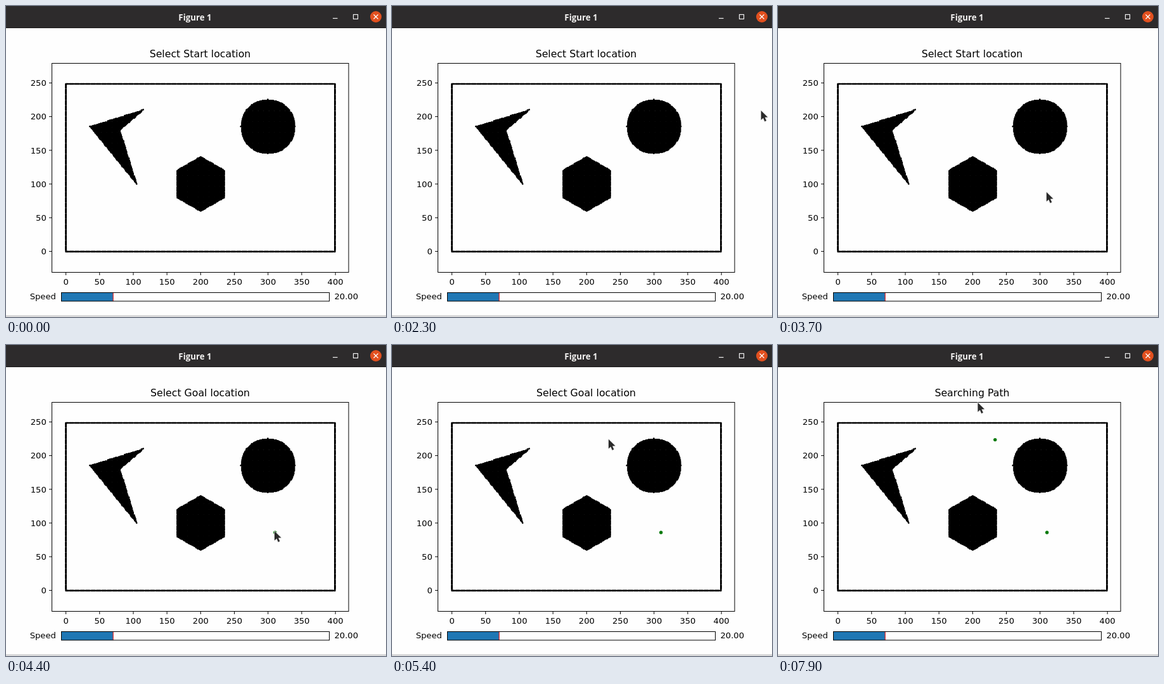
Animation, 600 px wide and 491 px high, one loop 8000 ms. Source, as an HTML page with a canvas:

```html
<!DOCTYPE html>
<html lang="en">
<head>
<meta charset="utf-8">
<title>Figure 1</title>
<style>
html, body { margin: 0; width: 100%; height: 100%; overflow: hidden; background: #fefefe; }
canvas { display: block; }
</style>
</head>
<body>
<canvas id="stage" width="600" height="491"></canvas>
<script>
const ctx = document.getElementById('stage').getContext('2d');
const LOOP = 8000, STEP = 100;
const UNIT = 1.0638, PIXEL = 0.946;
const SANS = '"DejaVu Sans", sans-serif';
const px = x => 94.6 + x * UNIT;
const py = y => 387.4 - y * UNIT;

// Cursor waypoints: time, x, y
const route = [
  [2200, 600, 150], [2700, 434, 297], [3000, 410, 303], [3300, 410, 303],
  [3700, 424, 294], [4500, 424, 294], [5300, 342, 149], [6900, 342, 149],
  [7700, 315.5, 91]
];
const START_CLICK = 4000, GOAL_CLICK = 6000;

function text(ctx, str, x, y, size, align, color = '#000', font = SANS, weight = 400) {
  ctx.font = `${weight} ${size}px ${font}`;
  ctx.textAlign = align;
  ctx.fillStyle = color;
  ctx.fillText(str, x, y);
}

function line(ctx, x1, y1, x2, y2, color, width) {
  ctx.strokeStyle = color;
  ctx.lineWidth = width;
  ctx.beginPath();
  ctx.moveTo(x1, y1);
  ctx.lineTo(x2, y2);
  ctx.stroke();
}

function dot(ctx, x, y, r, color) {
  ctx.fillStyle = color;
  ctx.beginPath();
  ctx.arc(x, y, r, 0, Math.PI * 2);
  ctx.fill();
}

function polygon(points) {
  const path = new Path2D();
  points.forEach(([x, y]) => path.lineTo(x, y));
  path.closePath();
  return path;
}

function drawTitleBar(c) {
  c.fillStyle = '#2d2b2c';
  c.fillRect(0, 0, 600, 35);
  c.fillStyle = '#1c1a1b';
  c.fillRect(0, 34, 600, 1);
  text(c, 'Figure 1', 298.5, 22.5, 13.3, 'center', '#f2f1f0', '"Open Sans", sans-serif', 700);
  line(c, 516, 19.5, 523.5, 19.5, '#f0f0f0', 1.2);
  c.strokeRect(548.5, 13.5, 7, 7);
  dot(c, 584, 17, 9, '#e2501f');
  line(c, 580.5, 13.5, 587.5, 20.5, '#fff', 1.3);
  line(c, 587.5, 13.5, 580.5, 20.5, '#fff', 1.3);
}

function drawAxes(c) {
  c.strokeStyle = '#000';
  c.lineWidth = 1;
  c.strokeRect(72.5, 90.5, 468.5, 330);
  for (let v = 0; v <= 400; v += 50) {
    line(c, px(v), 420.5, px(v), 425, '#000', 1);
    text(c, v, px(v), 440, 13.14, 'center');
    if (v > 250) continue;
    line(c, 68, py(v), 72.5, py(v), '#000', 1);
    text(c, v, 63.8, py(v) + 4.8, 13.14, 'right');
  }
}

// Obstacles are dense grids of small round markers.
function drawObstacles(c) {
  const arrow = polygon([[36, 185], [115, 210], [80, 180], [105, 100]]);
  const hexagon = polygon([[200, 140.4], [235.1, 120.2], [235.1, 79.8],
    [200, 59.6], [164.9, 79.8], [164.9, 120.2]]);
  const snap = v => Math.round(v / PIXEL) * PIXEL;
  for (let x = 0; x < 400; x++) {
    for (let y = 0; y < 250; y++) {
      const wall = x === 0 || y === 0 || x === 399 || y === 249;
      const solid = wall || Math.hypot(x - 300, y - 185) <= 40 ||
        c.isPointInPath(arrow, x, y) || c.isPointInPath(hexagon, x, y);
      if (solid) dot(c, snap(px(x)), snap(py(y)), 1.35, '#000');
    }
  }
}

function drawSlider(c) {
  text(c, 'Speed', 78.8, 463, 13.14, 'right');
  text(c, '20.00', 518.5, 463, 13.14, 'left');
  c.fillStyle = '#1f77b4';
  c.fillRect(88, 453, 81, 13);
  line(c, 169.2, 453, 169.2, 466, '#e02020', 1.2);
  c.strokeStyle = '#000';
  c.lineWidth = 1;
  c.strokeRect(87.5, 452.5, 423, 13.5);
}

function buildScene() {
  const layer = document.createElement('canvas');
  layer.width = 600;
  layer.height = 491;
  const c = layer.getContext('2d');
  c.fillStyle = '#fefefe';
  c.fillRect(0, 0, 600, 491);
  c.fillStyle = '#d9d9da';
  c.fillRect(0, 488, 600, 3);
  drawTitleBar(c);
  drawAxes(c);
  drawObstacles(c);
  drawSlider(c);
  return layer;
}

const scene = buildScene();
const pointer = polygon([[0, 0], [0, 14.5], [3.4, 11.4], [5.8, 17],
  [8.3, 15.8], [5.9, 10.5], [10.4, 10.3]]);

function cursorAt(t) {
  if (t < route[0][0]) return null;
  const i = route.findIndex(p => p[0] > t);
  if (i < 0) return route[route.length - 1].slice(1);
  const [t0, x0, y0] = route[i - 1], [t1, x1, y1] = route[i];
  const k = (t - t0) / (t1 - t0), e = k * k * (3 - 2 * k);
  return [x0 + (x1 - x0) * e, y0 + (y1 - y0) * e];
}

function drawCursor([x, y]) {
  ctx.save();
  ctx.translate(x, y);
  ctx.lineWidth = 1.6;
  ctx.lineJoin = 'round';
  ctx.strokeStyle = '#e4e4e4';
  ctx.stroke(pointer);
  ctx.fillStyle = '#2a2a2a';
  ctx.fill(pointer);
  ctx.restore();
}

function draw(t) {
  ctx.drawImage(scene, 0, 0);
  const title = t < START_CLICK ? 'Select Start location'
    : t < GOAL_CLICK ? 'Select Goal location' : 'Searching Path';
  text(ctx, title, 306.5, 81, 15.77, 'center');
  if (t >= START_CLICK) dot(ctx, 424.7, 296, 2.7, '#087a0c');
  if (t >= GOAL_CLICK) dot(ctx, 342.8, 149.6, 2.7, '#087a0c');
  const cursor = cursorAt(t);
  if (cursor) drawCursor(cursor);
}

const origin = performance.now();
function tick() {
  const t = (performance.now() - origin) % LOOP;
  draw(Math.floor(t / STEP) * STEP);
  requestAnimationFrame(tick);
}
tick();
</script>
</body>
</html>
```
